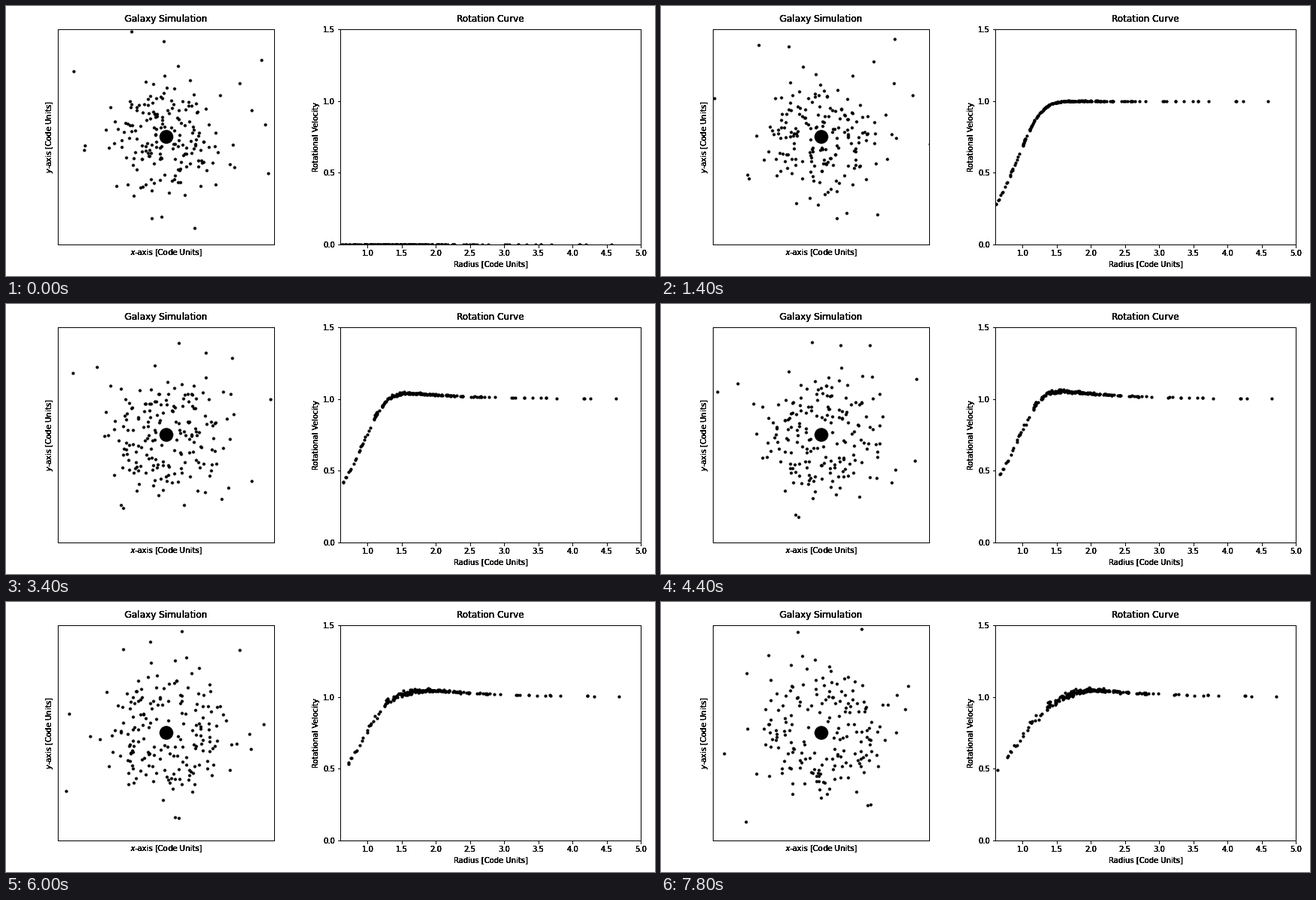
Animation of 864 by 360 pixels, one loop 8 s. Source, as a matplotlib script:

```python
import numpy as np
import matplotlib.pyplot as plt
from matplotlib.animation import FuncAnimation

W, H, DPI = 864, 360, 72
FRAMES, INTERVAL = 40, 200
STEP = 5.8          # pixels travelled per frame at unit speed
DRIFT = 0.033       # growth of the squared radius per frame at unit speed
SCALE = 36          # pixels per code unit
COUNT = 190
LAYERS = 5          # stacked copies that give lettering a solid black edge

plt.rcParams.update({"font.family": "DejaVu Sans", "font.size": 10})
rng = np.random.default_rng(11)

# The few far stars, as pixel offsets from the centre (y up)
FAR = np.array([(-46, 140), (-3, 127), (-123, 87), (127, 102), (98, 71),
                (114, 35), (132, 16), (136, -49), (38, -121), (-6, -106)])


def speed(radius, t):
    """Rising, flat rotation curve that heats up and later sags in the middle."""
    x = radius - 1
    base = 1 / (1 + np.exp(-(0.8 + 5.25 * x + 3.2 * (x ** 2 + x ** 3))))
    heat = 0.5 * (1 - np.exp(-max(t - 7, 0) / 18)) * np.exp(-radius)
    sag = 0.0088 * max(t - 22, 0) * np.exp(-((radius - 1.25) / 0.45) ** 2)
    return base + heat - sag


def simulate():
    """Return star positions, radii and speeds for every frame."""
    near = COUNT - len(FAR)
    r = np.r_[np.hypot(*FAR.T), np.clip(rng.gamma(4, 12, near), 14, 110)]
    angle = np.r_[np.arctan2(FAR[:, 1], FAR[:, 0]),
                  rng.uniform(0, 2 * np.pi, near)]
    radius = np.hypot(r / SCALE, rng.normal(0, 0.6, COUNT))
    jitter = rng.normal(0, 0.014, COUNT) / np.maximum(radius, 1) ** 1.5

    states = []
    for t in range(FRAMES):
        v = speed(radius, t)
        shown = v * (1 + jitter * min(t / FRAMES, 1)) if t else 0 * v
        states.append((r * np.cos(angle), r * np.sin(angle), radius, shown))
        angle = angle + np.arctan(STEP * v / r)
        r = np.sqrt(r ** 2 + (STEP * v) ** 2)
        radius = np.sqrt(radius ** 2 + DRIFT * v ** 2)
    return states


fig = plt.figure(figsize=(W / DPI, H / DPI), dpi=DPI, facecolor="white")


def panel(left, right, title, xlabel, ylabel, xlim, ylim):
    top, bottom = 31, 318
    ax = fig.add_axes([left / W, 1 - bottom / H,
                       (right - left) / W, (bottom - top) / H])
    ax.patch.set_visible(False)
    ax.set(xlim=xlim, ylim=ylim, xlabel=xlabel, ylabel=ylabel)
    ax.set_title(title, pad=10)
    return ax


for _ in range(LAYERS):
    galaxy = panel(69, 357, "Galaxy Simulation", "$x$-axis [Code Units]",
                   "$y$-axis [Code Units]", (-144, 144), (-143.5, 143.5))
    galaxy.set(xticks=[], yticks=[])
    curve = panel(445, 845, "Rotation Curve", "Radius [Code Units]",
                  "Rotational Velocity", (0.6, 5), (0, 1.5))
    curve.set(xticks=np.arange(1, 5.1, 0.5), yticks=np.arange(0, 1.6, 0.5))

DOT = dict(ls="", marker="o", color="black", mew=0)
galaxy.plot([0], [0], ms=18.5, **DOT)
stars, = galaxy.plot([], [], ms=4.2, **DOT)
speeds, = curve.plot([], [], ms=4.2, **DOT)

STATES = simulate()


def draw(i):
    x, y, radius, v = STATES[i]
    stars.set_data(x, y)
    speeds.set_data(radius, v)
    return stars, speeds


anim = FuncAnimation(fig, draw, frames=FRAMES, interval=INTERVAL,
                     repeat=True, repeat_delay=0)
plt.show()
```
